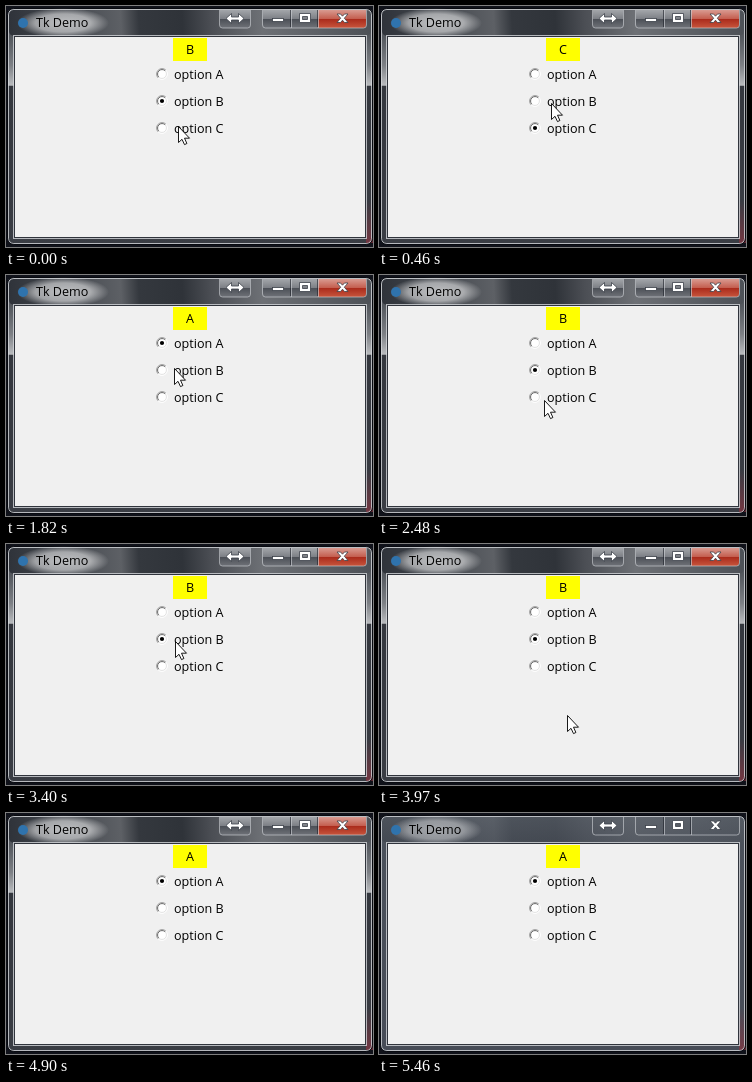
Recreate the animation shown at these times as an HTML page. Size 367 px wide and 241 px high, loop 5560 ms.

```html
<!DOCTYPE html>
<html lang="en">
<head>
<meta charset="utf-8">
<title>Tk Demo</title>
<style>
  html, body { margin: 0; width: 100%; height: 100%; overflow: hidden; background: #10121a; }
  svg { display: block; }
  text { font: 12.6px "Open Sans", "Noto Sans", sans-serif; fill: #000; }
  .glyph { fill: #fff; stroke: #3b4049; stroke-width: .8; }
  .idle .lit { display: none; }
  .idle .shade { opacity: .3; }
  .idle .glow { opacity: .75; }
</style>
</head>
<body>
<svg id="stage" width="367" height="241" viewBox="0 0 367 241">
  <defs>
    <linearGradient id="glass" x2="0" y2="1">
      <stop offset="0" stop-color="#565a60"/>
      <stop offset=".12" stop-color="#54585e"/>
      <stop offset=".24" stop-color="#7d8085"/>
      <stop offset=".325" stop-color="#b9bbbe"/>
      <stop offset=".33" stop-color="#34373e"/>
      <stop offset="1" stop-color="#3a3d44"/>
    </linearGradient>
    <linearGradient id="bar" gradientUnits="userSpaceOnUse" x1="3" y1="24" x2="364" y2="4">
      <stop offset="0" stop-color="#2f333a"/>
      <stop offset=".2" stop-color="#4a4e54"/>
      <stop offset=".31" stop-color="#5d6065"/>
      <stop offset=".36" stop-color="#34383e"/>
      <stop offset=".48" stop-color="#2f3339"/>
      <stop offset=".56" stop-color="#4b4e54"/>
      <stop offset=".7" stop-color="#6d7075"/>
      <stop offset="1" stop-color="#4d5157"/>
    </linearGradient>
    <linearGradient id="idleGlass" x2="0" y2="1">
      <stop offset="0" stop-color="#596069"/>
      <stop offset=".12" stop-color="#4b515b"/>
      <stop offset="1" stop-color="#474c57"/>
    </linearGradient>
    <linearGradient id="ember" x2="0" y2="1">
      <stop offset="0" stop-color="#8a3440" stop-opacity="0"/>
      <stop offset="1" stop-color="#8a3440" stop-opacity=".7"/>
    </linearGradient>
    <linearGradient id="red" x2="0" y2="1">
      <stop offset="0" stop-color="#d99a90"/>
      <stop offset=".48" stop-color="#c45f50"/>
      <stop offset=".5" stop-color="#a92a1b"/>
      <stop offset="1" stop-color="#c8553c"/>
    </linearGradient>
    <linearGradient id="gray" x2="0" y2="1">
      <stop offset="0" stop-color="#a3a6aa"/>
      <stop offset=".48" stop-color="#7d8086"/>
      <stop offset=".5" stop-color="#4b4f56"/>
      <stop offset="1" stop-color="#6f7278"/>
    </linearGradient>
    <radialGradient id="halo">
      <stop offset="0" stop-color="#fff" stop-opacity=".65"/>
      <stop offset=".6" stop-color="#fff" stop-opacity=".52"/>
      <stop offset="1" stop-color="#fff" stop-opacity="0"/>
    </radialGradient>
  </defs>

  <rect width="367" height="241" fill="#10121a"/>
  <rect x="1.5" y="2.5" width="365" height="236" rx="6" fill="url(#idleGlass)"/>
  <rect class="lit" x="1.5" y="2.5" width="365" height="236" rx="6" fill="url(#glass)"/>
  <rect class="shade" x="3" y="4" width="362" height="26" rx="5" fill="url(#bar)"/>
  <rect x="360" y="195" width="7" height="42" fill="url(#ember)"/>
  <rect x="2.5" y="3.5" width="363" height="234" rx="5" fill="none" stroke="#d5d8db" stroke-opacity=".8"/>
  <rect x="1.5" y="2.5" width="365" height="236" rx="6" fill="none" stroke="#080a10"/>

  <ellipse class="glow" cx="57" cy="17" rx="46" ry="15" fill="url(#halo)"/>
  <circle cx="17" cy="17" r="5" fill="#2f73ad"/>
  <text x="30" y="21">Tk Demo</text>

  <path class="lit" fill="url(#gray)" d="M214 4h30v15q0 3-3 3h-24q-3 0-3-3zM257 4h55v18h-52q-3 0-3-3z"/>
  <path class="lit" fill="url(#red)" d="M312 4h48v15q0 3-3 3h-45z"/>
  <path fill="none" stroke="#c9ccd1" stroke-opacity=".65"
    d="M213.5 4v15q0 3 3 3h25q3 0 3-3v-15M256.5 4v15q0 3 3 3h98q3 0 3-3v-15M285.5 4v18M312.5 4v18"/>
  <path fill="none" stroke="#1d2129" stroke-opacity=".6" d="M284.5 4v17M311.5 4v17"/>
  <path class="glyph" d="M220 12.5l5.5-5v3.500h7v-3.500l5.500 5l-5.500 5v-3.500h-7v3.500z"/>
  <rect class="glyph" x="266.500" y="12.500" width="11" height="3"/>
  <path class="glyph" fill-rule="evenodd" d="M293.500 7.500h11v9h-11zM296.500 10.500v3h5v-3z"/>
  <path class="glyph" d="M331 8h3.500l2 2.200l2-2.200h3.500l-3.700 4.200l3.700 4.300h-3.500l-2-2.300l-2 2.300h-3.500l3.700-4.300z"/>

  <rect x="7.500" y="29.500" width="353" height="203" fill="none" stroke="#d5d8db" stroke-opacity=".8"/>
  <rect x="8.500" y="30.500" width="351" height="201" fill="#f0f0f0" stroke="#30343c"/>

  <rect x="167" y="32" width="34" height="23" fill="#ff0"/>
  <text id="value" x="184" y="48" text-anchor="middle">B</text>
  <g id="options"></g>
  <circle id="dot" cx="156" r="2.100"/>
  <path id="cursor" d="M.5 .5v16l3.500-3.200l2.500 5.300l2.400-1.100l-2.400-5.300h5z" fill="#fff" stroke="#000" stroke-width=".9"/>
</svg>
<script>
const el = id => document.getElementById(id);
const LOOP = 5560, IDLE = 5460, HIDE = 4900;
const rowY = name => 68 + 27 * "ABC".indexOf(name);

// Pointer samples: time, x, y
const moves = [
  [0, 172, 120], [300, 172, 112], [460, 172, 97], [1030, 170, 78], [1150, 169, 69],
  [1300, 169, 68], [1700, 168, 82], [1820, 168, 93], [2230, 167, 104], [2350, 166, 118],
  [2480, 165, 125], [2900, 168, 105], [3040, 169, 99], [3160, 169, 97], [3560, 243, 198],
  [3710, 264, 219], [3830, 269, 225], [3970, 188, 171], [4090, 188, 145], [4240, 180, 104],
  [4360, 176, 77], [4480, 175, 67], [4630, 181, 74], [4780, 270, 225]
];
const picks = [
  [0, "B"], [150, "C"], [910, "B"], [1420, "A"], [2080, "B"],
  [2750, "C"], [3400, "B"], [4630, "A"]
];
const latest = (list, t) => list.findLast(item => item[0] <= t);

const arc = (r, color, lower) =>
  `<path d="M${-r * .707} ${r * .707}A${r} ${r} 0 0 ${lower ? 0 : 1} ${r * .707} ${-r * .707}" fill="none" stroke="${color}"/>`;

el("options").innerHTML = [..."ABC"].map(name => `
  <g transform="translate(156 ${rowY(name)})">
    <circle r="5" fill="#fff"/>
    ${arc(5.5, "#a0a0a0")}${arc(5.5, "#fff", true)}
    ${arc(4.5, "#696969")}${arc(4.5, "#e3e3e3", true)}
    <text x="12" y="5">option ${name}</text>
  </g>`).join("");

const start = performance.now();

function draw() {
  const t = (performance.now() - start) % LOOP;
  const [, x, y] = latest(moves, t);
  const [, name] = latest(picks, t);
  el("value").textContent = name;
  el("dot").setAttribute("cy", rowY(name));
  el("cursor").setAttribute("transform", `translate(${x} ${y})`);
  el("cursor").style.display = t < HIDE ? "" : "none";
  el("stage").classList.toggle("idle", t >= IDLE);
  requestAnimationFrame(draw);
}
draw();
</script>
</body>
</html>
```
